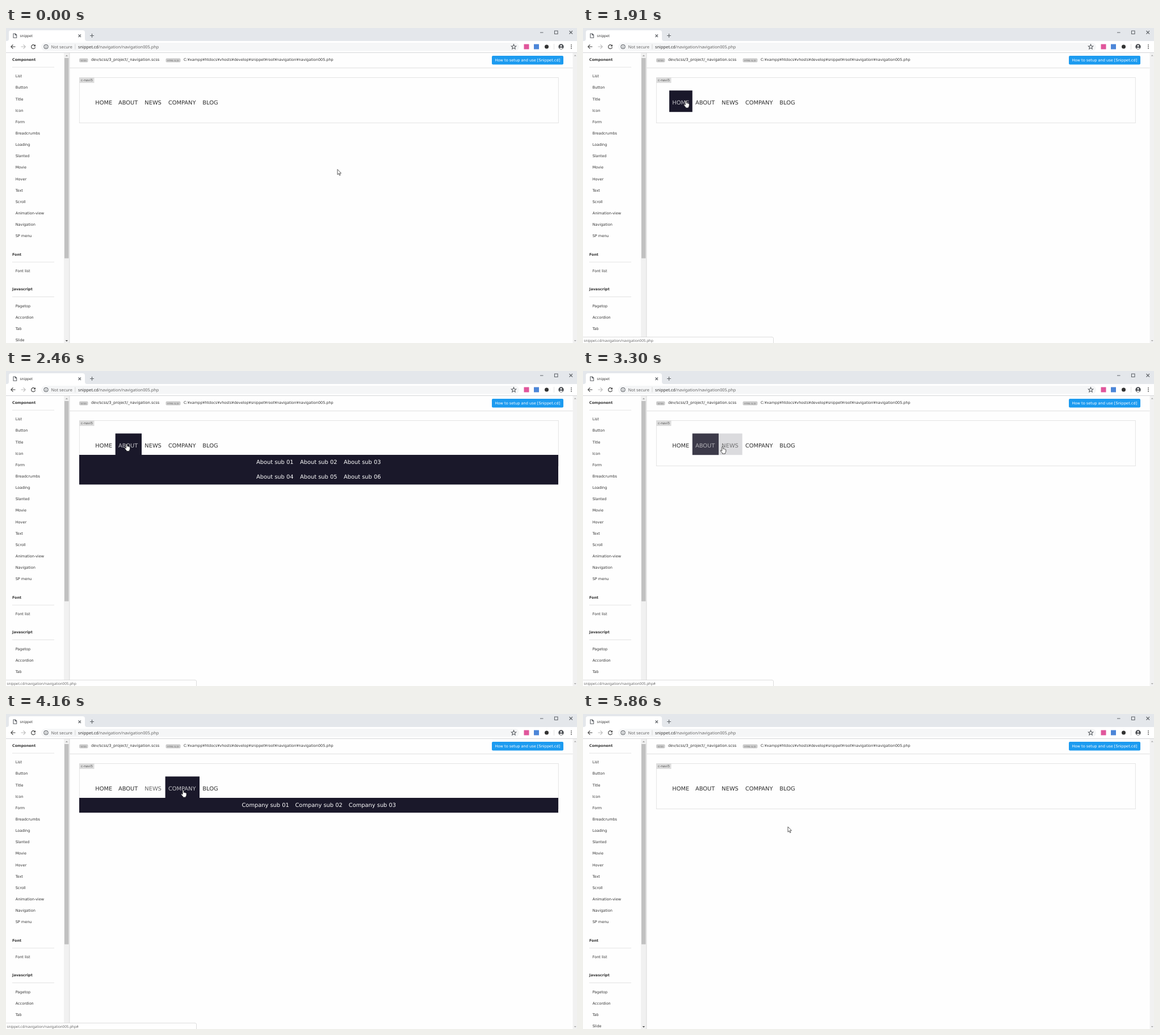
Write an HTML page that moves like this. It is 1006 px wide and 556 px high and loops after 6.79 s.

```html
<!DOCTYPE html>
<html lang="en">
<head>
<meta charset="utf-8">
<title>Navigation</title>
<style>
  html, body { margin: 0; width: 100%; height: 100%; overflow: hidden; background: #fefefe; }
  svg { display: block; width: 100%; height: 100%; }
  text { font-family: "DejaVu Sans", sans-serif; font-size: 6.5px; fill: #333; text-rendering: geometricPrecision; white-space: pre; }
  .ui { font-family: "Noto Sans", "Open Sans", sans-serif; }
  .head { font-size: 6.4px; font-weight: bold; }
  .nav { font-size: 9.85px; }
  .line { fill: none; stroke: #5f6368; stroke-width: 1.1; }
</style>
</head>
<body>
<svg id="stage" viewBox="0 0 1006 556">
  <rect width="1006" height="556" fill="#fefefe"/>

  <g id="browser">
    <rect width="1006" height="24" fill="#e4e7eb"/>
    <path d="M1 23q4 0 4-4V8q0-4 4-4H135q4 0 4 4v11q0 4 4 4z" fill="#fff"/>
    <rect y="23" width="1006" height="20" fill="#fff"/>
    <rect x="62" y="26" width="842" height="14.5" rx="7.2" fill="#f5f6f7"/>
    <rect y="43" width="1006" height="1" fill="#d5d6d8"/>
    <path class="line" d="M13 10h3.5l2.2 2.2v5H13zM16.300 10v2.500h2.400" stroke-width=".8"/>
    <text class="ui" x="24.500" y="16" style="font-size:6.4px">snippet</text>
    <path class="line" d="M127.500 11.500l4.500 4.500m0-4.500l-4.500 4.500M148 13.500h7m-3.500-3.500v7"/>
    <path class="line" d="M941 8h5.500M966.500 5h5.500v5.500h-5.500zM992.500 5l5.500 5.500m0-5.500l-5.500 5.500" stroke-width=".8"/>
    <path class="line" d="M16.500 33H8.800m3.600-3.600L8.800 33l3.600 3.600" style="stroke:#444"/>
    <path class="line" d="M26.500 33h7.700m-3.600-3.600l3.600 3.600-3.600 3.600" style="stroke:#bbb"/>
    <path class="line" d="M51 31.200a3.500 3.500 0 1 0 .5 2.600" style="stroke:#444"/>
    <path d="M52 29v3.400h-3.400z" fill="#444"/>
    <circle class="line" cx="70.500" cy="33" r="3.500" stroke-width=".8"/>
    <path class="line" d="M70.500 32.400v2.600m0-4.300v.9"/>
    <text class="ui" x="79.500" y="35.700" style="font-size:7.35px;fill:#666">Not secure</text>
    <rect x="121.500" y="28.500" width=".8" height="9" fill="#ccc"/>
    <text class="ui" x="127" y="35.700" style="font-size:7.35px">snippet.cd<tspan fill="#666">/navigation/navigation005.php</tspan></text>
    <path class="line" d="M894.500 29l1.200 2.800 3 .2-2.300 2 .8 3-2.700-1.600-2.700 1.600.8-3-2.300-2 3-.2z" stroke-width=".8"/>
    <rect x="912.500" y="28.500" width="9" height="9" fill="#e0569c"/>
    <rect x="930" y="28.500" width="9" height="9" fill="#4c86d8"/>
    <circle cx="952.500" cy="33" r="3.500" fill="#333"/>
    <rect x="965" y="28" width=".8" height="10" fill="#ddd"/>
    <circle cx="978" cy="33" r="4.700" fill="#4a4d52"/>
    <circle cx="978" cy="31.500" r="1.500" fill="#fff"/>
    <path d="M975 35.800q3-2.800 6 0-3 2.600-6 0z" fill="#fff"/>
    <g fill="#555"><circle cx="996" cy="30" r=".9"/><circle cx="996" cy="33" r=".9"/><circle cx="996" cy="36" r=".9"/></g>
  </g>

  <g id="side">
    <rect x="102" y="44" width="9.500" height="512" fill="#f1f1f1"/>
    <rect x="103" y="53" width="7.500" height="353.500" fill="#c1c1c1"/>
    <rect x="111.500" y="44" width=".8" height="512" fill="#d0d0d0"/>
    <path d="M104.700 50l2.200-2.500 2.200 2.500z" fill="#a3a3a3"/>
    <path d="M104.700 551l2.200 2.500 2.200-2.500z" fill="#505050"/>
  </g>

  <g id="page">
    <rect x="998.500" y="44" width="7.500" height="512" fill="#f1f1f1"/>
    <path d="M1000.800 49.500l2-2.200 2 2.200zM1000.800 551l2 2.200 2-2.200z" fill="#a8a8a8"/>
    <rect x="112" y="70" width="886.500" height=".9" fill="#ddd"/>
    <rect x="129" y="53.500" width="15.500" height="7" rx="2" fill="#ccc"/>
    <text x="131.500" y="58.500" style="font-size:4px;fill:#777">SCSS</text>
    <text x="150" y="58" style="font-size:6.77px">dev/scss/3_project/_navigation.scss</text>
    <rect x="281.500" y="53.500" width="26" height="7" rx="2" fill="#ccc"/>
    <text x="284" y="58.500" style="font-size:4px;fill:#777">HTML &amp; JS</text>
    <text x="313" y="58">C:¥xampp¥htdocs¥vhosts¥develop¥snippet¥root¥navigation¥navigation005.php</text>
    <rect x="856" y="49" width="126" height="15.500" rx="2" fill="#1c9bf0"/>
    <text x="861.500" y="59.300" style="font-size:6.64px;fill:#fff">How to setup and use [Snippet.cd]</text>
    <rect x="129.300" y="87.400" width="844" height="80.200" fill="none" stroke="#ddd" stroke-width=".8"/>
    <rect x="129" y="87" width="26.500" height="10" fill="#ddd"/>
    <text x="132" y="94.200" style="font-size:5.74px;fill:#555">c-navi5</text>
  </g>

  <g id="menu"></g>

  <g id="status">
    <path d="M-1 557V545.500H333q2.500 0 2.500 2.500v9z" fill="#fff" stroke="#d4d4d4" stroke-width=".8"/>
    <text id="link" class="ui" x="1.500" y="553.700" style="font-size:6.32px;fill:#666"></text>
  </g>

  <g id="arrow"><path d="M0 0v9.300l2.100-2 1.500 3.400 1.500-.7-1.500-3.200h2.900z" fill="#fff" stroke="#333" stroke-width=".8"/></g>
  <g id="hand"><path d="M-1.300 1q1.100-1.600 2.200 0v3.600q1-.7 1.700.2 1-.5 1.600.4 1.300-.2 1.400 1v3q-.3 1.600-1.200 2.400v1.400h-5v-1.200Q-2.600 10-4 7.400q.4-1.500 2.700.5z" fill="#fff" stroke="#222" stroke-width=".8"/></g>
</svg>

<script>
const LOOP = 6790, FADE = 200;
const NS = "http://www.w3.org/2000/svg";
const $ = id => document.getElementById(id);

const add = (parent, tag, attrs, label) => {
  const el = document.createElementNS(NS, tag);
  for (const k in attrs) el.setAttribute(k, attrs[k]);
  if (label) el.textContent = label;
  parent.append(el);
  return el;
};
const clamp = v => Math.max(0, Math.min(1, v));
const lerp = (a, b, p) => a + (b - a) * p;
const mix = (a, b, p) => `rgb(${a.map((v, i) => Math.round(lerp(v, b[i], p)))})`;
const out = p => 1 - (1 - p) ** 3;
const inOut = p => p * p * (3 - 2 * p);

// Sidebar
const side = $("side");
const section = (title, y, items) => {
  add(side, "text", { x: 11, y: y + 2.5, class: "head" }, title);
  add(side, "rect", { x: 11, y: y + 13.7, width: 74, height: 0.8, fill: "#ddd" });
  items.forEach((s, i) => add(side, "text", { x: 16.7, y: y + 32.3 + i * 20.14 }, s));
};
section("Component", 55, ["List", "Button", "Title", "Icon", "Form", "Breadcrumbs", "Loading",
  "Slanted", "Movie", "Hover", "Text", "Scroll", "Animation-view", "Navigation", "SP menu"]);
section("Font", 399, ["Font list"]);
section("Javascript", 460.5, ["Pagetop", "Accordion", "Tab", "Slide"]);

// Menu: label, box edges, hover span, columns of the drop-down
const DARK = [26, 24, 42], INK = [45, 45, 45], WHITE = [255, 255, 255];
const menu = $("menu");
const items = [
  ["HOME", 152, 192.7, 1460, 2140],
  ["ABOUT", 192.7, 239, 2140, 3278, "About", [441, 518, 595], 2],
  ["NEWS", 239, 280.6, 3278, 3955],
  ["COMPANY", 280.6, 341, 3955, 4613, "Company", [415.5, 509.5, 603.8], 1],
  ["BLOG", 341, 379, 4613, 5440]
].map(([label, left, right, enter, leave, sub, cols, rows]) => {
  const box = add(menu, "rect", { x: left, y: 110.3, width: right - left, height: 37.9, fill: mix(DARK, DARK, 0) });
  const text = add(menu, "text", { x: left + 5.3, y: 135, class: "nav" }, label);
  let drop;
  if (sub) {
    drop = add(menu, "g", {});
    add(drop, "rect", { x: 129, y: 148, width: 844, height: rows * 26.2, fill: mix(DARK, DARK, 0) });
    for (let r = 0; r < rows; r++)
      cols.forEach((x, c) => add(drop, "text", { x, y: 164 + r * 26.3, class: "nav", style: "fill:#fff" },
        `${sub} sub 0${r * cols.length + c + 1}`));
  }
  return { box, text, drop, enter, leave };
});

// Pointer moves: start, end, steps, easing, path (two points or a cubic)
const moves = [
  [670, 820, 3, inOut, [[584, 249.500], [579, 259]]],
  [1070, 1700, 9, out, [[579, 259], [480, 285], [200, 230], [183, 129]]],
  [1760, 1910, 3, inOut, [[183, 129], [181.500, 128]]],
  [2140, 2540, 6, out, [[181.500, 128], [213, 128.500]]],
  [2770, 2770, 1, out, [[213, 128.500], [218, 129]]],
  [3230, 3620, 6, out, [[218, 129], [258, 134.700]]],
  [3930, 4310, 6, out, [[258, 134.700], [314.500, 134]]],
  [4470, 4940, 7, out, [[314.500, 134], [356, 134.500]]],
  [5320, 5860, 8, inOut, [[356, 134.500], [361, 199]]]
];
const along = (pts, p) => {
  while (pts.length > 1)
    pts = pts.slice(1).map((b, i) => [lerp(pts[i][0], b[0], p), lerp(pts[i][1], b[1], p)]);
  return pts[0];
};

const sample = t => {
  let time = 0, pos = moves[0][4][0];
  for (const [start, end, steps, ease, path] of moves) {
    if (t < start) break;
    const gap = (end - start) / (steps - 1 || 1) || 1;
    const i = Math.min(steps - 1, Math.floor((t - start + 9) / gap));
    time = start + i * gap;
    pos = along(path, ease((i + 1) / steps));
  }
  return { time, pos };
};

const show = (el, on) => el.setAttribute("visibility", on ? "visible" : "hidden");

function draw(t) {
  const { time, pos } = sample(t);
  let hovering = false;
  for (const { box, text, drop, enter, leave } of items) {
    const over = time >= enter && time < leave;
    const level = clamp((time - enter) / FADE) - clamp((time - leave) / FADE);
    hovering ||= over;
    box.setAttribute("opacity", level);
    text.style.fill = mix(INK, WHITE, level);
    text.setAttribute("opacity", time < enter ? 1 : over ? 0.75 : lerp(0.72, 1, clamp((time - leave - FADE) / 100)));
    if (drop) show(drop, over);
  }
  show($("status"), time >= 1830 && time < 5700);
  $("link").textContent = "snippet.cd/navigation/navigation005.php" + (time >= 3278 ? "#" : "");
  show($("hand"), hovering);
  show($("arrow"), !hovering);
  for (const id of ["hand", "arrow"]) $(id).setAttribute("transform", `translate(${pos})`);
}

const begin = performance.now();
function tick() {
  draw((performance.now() - begin) % LOOP);
  requestAnimationFrame(tick);
}
draw(0);
requestAnimationFrame(tick);
</script>
</body>
</html>
```
